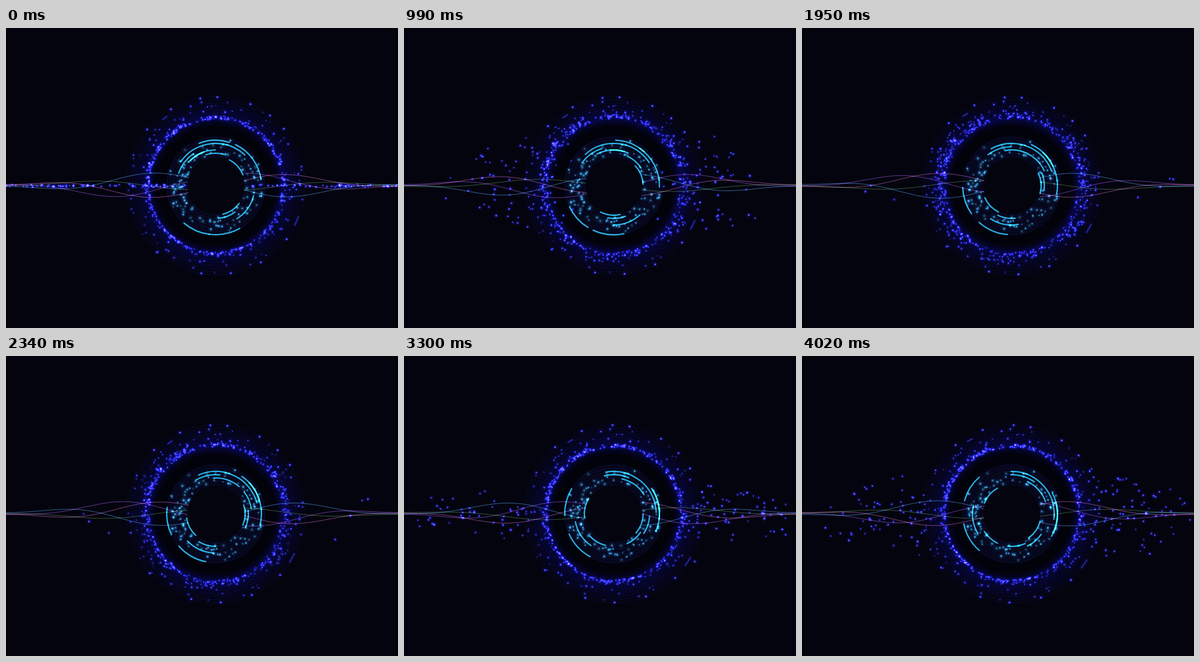
These frames come from a looping animation (600 px wide and 460 px high, 4.05 s). An HTML page with a canvas:

```html
<!DOCTYPE html>
<html lang="en">
<head>
<meta charset="utf-8">
<title>Black hole</title>
<style>
html, body { margin: 0; width: 100%; height: 100%; overflow: hidden; background: #04040e; }
canvas { display: block; }
</style>
</head>
<body>
<canvas id="stage" width="600" height="460"></canvas>
<script>
const ctx = document.getElementById('stage').getContext('2d');
const CX = 321, CY = 242, LOOP = 4050, STEP = 30, TAU = Math.PI * 2;
const BACK = '#04040e';
const rad = deg => deg * Math.PI / 180;

let seed = 71;
function rnd(min = 0, max = 1) {
  seed = (seed * 16807) % 2147483647;
  return min + (max - min) * seed / 2147483647;
}
const many = (n, make) => Array.from({ length: n }, (_, i) => make(i));

// Soft round dot, prerendered
function sprite(core, mid, glow) {
  const c = document.createElement('canvas');
  c.width = c.height = 32;
  const g = c.getContext('2d');
  const fill = g.createRadialGradient(16, 16, 0, 16, 16, 16);
  fill.addColorStop(0, `rgba(${core},1)`);
  fill.addColorStop(.27, `rgba(${mid},.95)`);
  fill.addColorStop(.42, `rgba(${glow},.38)`);
  fill.addColorStop(1, `rgba(${glow},0)`);
  g.fillStyle = fill;
  g.fillRect(0, 0, 32, 32);
  return c;
}
const blue = sprite('150,150,255', '65,65,255', '20,20,215');
const teal = sprite('125,230,245', '50,150,185', '15,90,140');

function dot(img, x, y, size, alpha) {
  ctx.globalAlpha = alpha;
  ctx.drawImage(img, x - size, y - size, size * 2, size * 2);
}

// Arcs: radius, start and end in degrees, degrees per second
const arcs = [
  [75, 60, 98, 17.6], [75, 97, 131, 24.4],
  [70, 248, 288, 24.1], [70, 295, 353, 9.2],
  [65, 214, 314, 13.5],
  [60, 198, 236, 17.4], [60, 14, 58, 33.6],
  [55, 224, 270, 17.7], [55, 221, 252, 43],
  [50, 252, 285, 43], [50, 53, 86, 15.4],
  [45, 297, 339, 19], [45, 36, 77, 41]
];

// Waves: colour, crest position at time zero, amplitude
const waves = [
  ['rgba(70,140,200,.6)', 236, 18],
  ['rgba(75,125,60,.6)', 110, 8],
  ['rgba(130,70,180,.65)', -62, 18],
  ['rgba(165,85,145,.65)', 21, 17]
];

const orbit = (a, r, speed, spread, size, alpha) => ({ a, r, speed, spread, size, alpha });
const rim = [260, 271, 239.7, 293, 131.4, 99.4, 80.2, 59.5, 37, 219.5, 307.6, 320];
const ring = [
  ...many(330, () => orbit(rnd(0, 360), 101.5 + 8 * rnd() * rnd(.2, 1), rnd(.8, 2.8),
    18 * rnd() ** 2, rnd(2.6, 4.3), rnd(.35, .95))),
  ...many(130, () => orbit(rnd(0, 360), 105 + 30 * rnd() ** 1.3, rnd(1, 2.8), 0,
    rnd(2.4, 4.4), rnd(.3, .95))),
  ...rim.map(a => orbit(a, 136, 2.8, 0, 4.2, .95)),
  ...many(6, i => orbit(231.5 + i * .7, 130, 1.8, 0, 2.4, .45)),
  ...many(7, i => orbit(20.5 + i, 135, 2.8, 0, 2.8, .5))
];
const disk = many(125, () =>
  orbit(rnd(0, 360), 46 + 27 * rnd() ** 1.2, rnd(.8, 3), 0, rnd(3, 6), rnd(.3, .9)));

// Particles born on the axis and pulled onto the ring
function faller(birth, life, reach) {
  const side = rnd() < .5 ? -1 : 1;
  const angle = rad(rnd(-43, 43)), r = rnd(103, 125);
  return {
    birth, life,
    x0: side < 0 ? rnd(0, reach) : rnd(600, 642 - reach),
    y0: CY + rnd(-3, 3) * rnd(),
    x1: CX + side * r * Math.cos(angle),
    y1: CY + r * Math.sin(angle),
    size: rnd(3, 4.6), alpha: rnd(.55, 1)
  };
}
const fallers = [
  ...many(120, () => faller(-.01, rnd(1.2, 1.85), 275)),
  ...many(7, () => faller(rnd(.9, 1.8), 2, 190)),
  ...many(150, () => faller(2.45 + 1.3 * rnd() ** 2, rnd(2.2, 3.2), 215))
];

function circle(r, style, width) {
  ctx.beginPath();
  ctx.arc(CX, CY, r, 0, TAU);
  ctx.strokeStyle = style;
  ctx.lineWidth = width;
  ctx.stroke();
}

const halo = ctx.createRadialGradient(CX, CY, 90, CX, CY, 141);
halo.addColorStop(0, 'rgba(6,6,60,0)');
halo.addColorStop(.25, 'rgba(7,7,85,.7)');
halo.addColorStop(.5, 'rgba(5,5,62,.55)');
halo.addColorStop(1, 'rgba(4,4,35,0)');

function drawGlow() {
  ctx.fillStyle = halo;
  ctx.beginPath();
  ctx.arc(CX, CY, 141, 0, TAU);
  ctx.arc(CX, CY, 90, 0, TAU, true);
  ctx.fill();
  for (let r = 103; r <= 137; r += 4.8) circle(r, 'rgba(25,25,130,.2)', 1);
  circle(60, 'rgba(6,10,45,.35)', 32);
  for (let r = 45; r <= 75; r += 5) circle(r, 'rgba(25,30,120,.3)', 1);
}

function drawOrbits(list, img, t, swell) {
  for (const p of list) {
    const a = rad(p.a + p.speed * t), r = p.r + p.spread * swell;
    dot(img, CX + r * Math.cos(a), CY + r * Math.sin(a), p.size, p.alpha);
  }
}

function drawFallers(t) {
  for (const f of fallers) {
    const age = t - f.birth;
    if (age < 0) continue;
    const p = Math.min(1, age / f.life);
    const fade = Math.max(0, 1 - Math.max(0, age - f.life) / .9);
    const x = f.x0 + (f.x1 - f.x0) * p * p;
    const y = f.y0 + (f.y1 - f.y0) * Math.sin(p * Math.PI / 2);
    dot(blue, x, y, f.size, f.alpha * fade);
  }
}

function drawArcs(t) {
  ctx.lineWidth = 2.1;
  ctx.strokeStyle = 'rgba(42,200,232,.84)';
  for (const [r, from, to, speed] of arcs) {
    ctx.beginPath();
    ctx.arc(CX, CY, r, rad(from + speed * t), rad(to + speed * t));
    ctx.stroke();
  }
}

function drawWaves(t) {
  ctx.lineWidth = 1;
  for (const [colour, crest, amp] of waves) {
    ctx.strokeStyle = colour;
    ctx.beginPath();
    for (let x = 0; x <= 600; x += 4) {
      const edge = Math.min(x, 600 - x);
      const env = 1.5 + amp * Math.sin(Math.PI * edge / 420) ** 2;
      const y = CY - .5 - env * Math.cos(TAU * (x - crest - 97 * t) / 420);
      if (x > 280 && x <= 364) ctx.moveTo(x, y);
      else ctx.lineTo(x, y);
    }
    ctx.stroke();
  }
}

function draw(t) {
  ctx.globalAlpha = 1;
  ctx.globalCompositeOperation = 'source-over';
  ctx.fillStyle = BACK;
  ctx.fillRect(0, 0, 600, 460);
  circle(87, '#02020b', 22);
  drawGlow();

  ctx.globalCompositeOperation = 'lighter';
  const swell = Math.exp(-(((t - 1.6) / .85) ** 2));
  drawOrbits(ring, blue, t, swell);
  drawFallers(t);
  drawOrbits(disk, teal, t, 0);
  ctx.globalAlpha = 1;
  drawArcs(t);
  drawWaves(t);

  ctx.globalCompositeOperation = 'source-over';
  ctx.fillStyle = BACK;
  ctx.beginPath();
  ctx.arc(CX, CY, 43, 0, TAU);
  ctx.fill();
}

const start = performance.now();
function tick() {
  const ms = (performance.now() - start) % LOOP;
  draw(Math.floor(ms / STEP) * STEP / 1000);
  requestAnimationFrame(tick);
}
tick();
</script>
</body>
</html>
```
